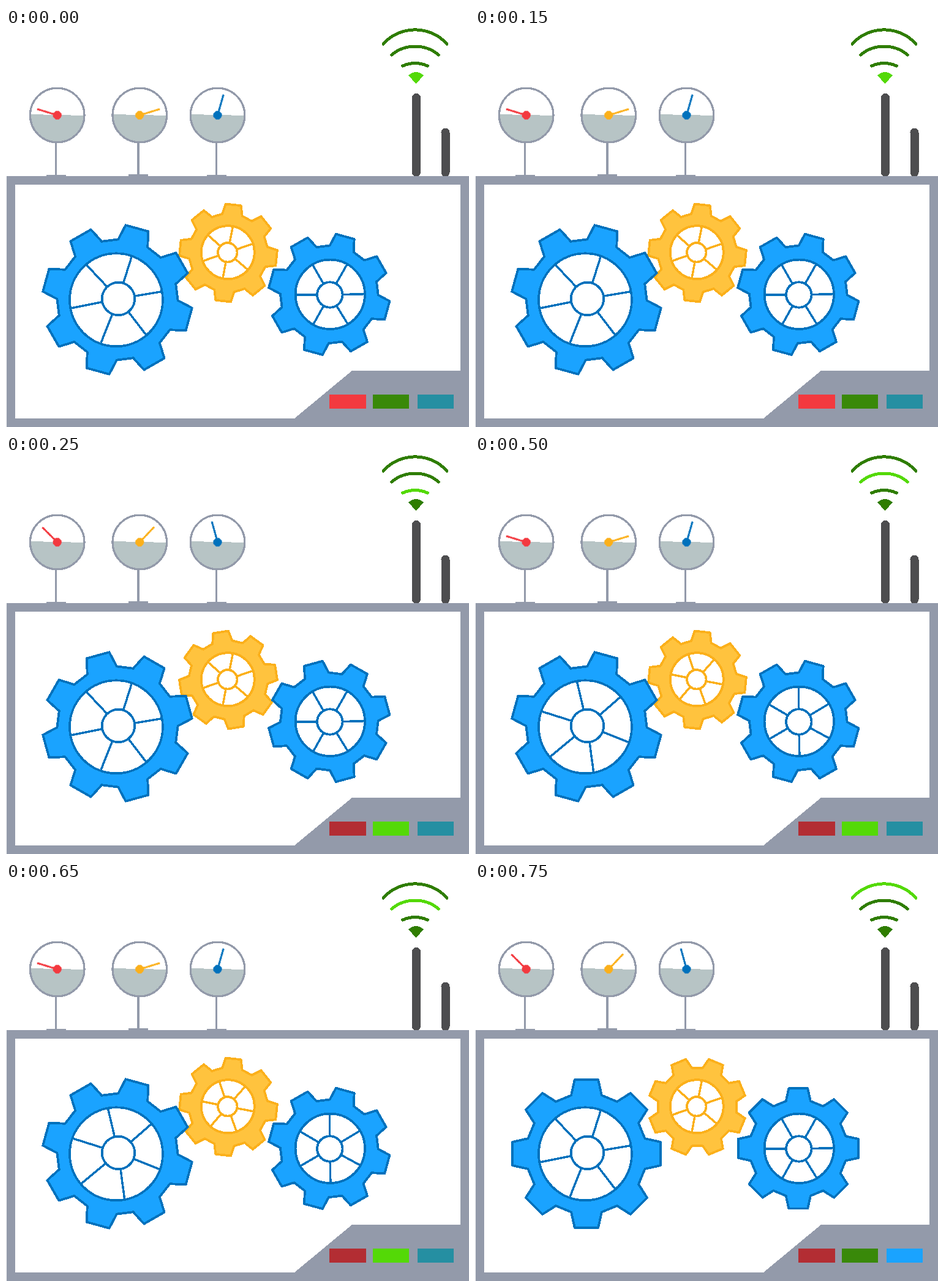
These frames come from a looping animation (756 px wide and 652 px high, 1 s). An HTML page:

```html
<!DOCTYPE html>
<html lang="en">
<head>
<meta charset="utf-8">
<title>Gear machine</title>
<style>
  html, body { margin: 0; width: 100%; height: 100%; overflow: hidden; background: #fff; }
  svg { display: block; width: 756px; height: 652px; }

  .pose { animation: show 1s step-end infinite; }
  .lamp { color: var(--off); animation: lit 1s step-end infinite; }
  .lamp.long { animation-name: lit-long; }
  .needle { animation: swing .5s step-end infinite; }
  .t1 { animation-delay: -.75s; }
  .t2 { animation-delay: -.5s; }
  .t3 { animation-delay: -.25s; }

  .red { --on: #f3393f; --off: #b32d33; }
  .green { --on: #54d907; --off: #398909; }
  .blue { --on: #1aa3ff; --off: #258fa2; }
  .signal { --on: #54d907; --off: #2f7d00; }

  @keyframes show { 0% { visibility: visible; } 25%, 100% { visibility: hidden; } }
  @keyframes lit { 0% { color: var(--on); } 25%, 100% { color: var(--off); } }
  @keyframes lit-long { 0% { color: var(--on); } 50%, 100% { color: var(--off); } }
  @keyframes swing { 0% { transform: rotate(0deg); } 50%, 100% { transform: rotate(var(--swing)); } }
</style>
</head>
<body>
<svg viewBox="0 0 756 652" shape-rendering="crispEdges">
  <!-- antennas -->
  <g stroke="#4d4d4f" stroke-width="14" stroke-linecap="round">
    <path d="M670 114V236M717.500 170.500V236"/>
  </g>

  <!-- signal -->
  <g fill="none" stroke="currentColor" stroke-width="5" stroke-linecap="round">
    <path class="lamp signal" fill="currentColor" stroke="none" d="M657 77.500Q669 66.500 682 77.500L669.500 91z"/>
    <path class="lamp signal t1" d="M647.500 62A51 51 0 0 1 688.500 62"/>
    <path class="lamp signal t2" d="M629.500 44A60 60 0 0 1 706.500 44"/>
    <path class="lamp signal t3" d="M616 26A70 70 0 0 1 720 26"/>
  </g>

  <g id="gauges"></g>

  <!-- cabinet -->
  <path fill="#939aaa" d="M1 242H756V652H1z"/>
  <path fill="#fff" d="M15 256H742V560H565L471 638H15z"/>
  <g fill="currentColor">
    <path class="lamp red" d="M528 599h60v23h-60z"/>
    <path class="lamp green long t1" d="M599 599h59v23h-59z"/>
    <path class="lamp blue t3" d="M672 599h59v23h-59z"/>
  </g>

  <g id="gears"></g>
</svg>

<script>
const BLUE = '#0071bc', YELLOW = '#fbb01b', RED = '#f3393f';

const polar = ([x, y], r, deg) => {
  const a = deg * Math.PI / 180;
  return [x + r * Math.cos(a), y + r * Math.sin(a)].map(v => +v.toFixed(1));
};

// the needle rests at an angle and swings to a second one
const gauge = (x, color, rest, swing, pole, width, foot) => `
  <path fill="#939aaa" d="M${pole - width / 2} 186h${width}V242h-${width}zM${pole - 16} ${foot}h32V243h-32z"/>
  <g transform="translate(${x} 142.500)">
    <circle r="44.500" fill="#fff"/>
    <path fill="#b7c4c5" d="M-44.500 -1.500L44.500 .5A44.500 44.500 0 0 1 -44.500 -1.500"/>
    <circle r="44.300" fill="none" stroke="#939aaa" stroke-width="3.200"/>
    <path class="needle" style="--swing:${swing}deg" d="M0 0L${polar([0, 0], 33.5, rest)}"
      stroke="${color}" stroke-width="3" stroke-linecap="round"/>
    <circle r="7" fill="${color}"/>
  </g>`;

document.getElementById('gauges').innerHTML =
  gauge(83.7, RED, 197, 28, 81.5, 3, 240) +
  gauge(218.3, YELLOW, -17, -29.5, 216, 4, 239) +
  gauge(345.5, BLUE, -74, -31.5, 343.5, 3, 240);

const teeth = (center, r, turn) => {
  const points = [];
  for (let mid = turn; mid < turn + 360; mid += 45) {
    points.push(
      polar(center, r * .805, mid - 14.6), polar(center, r, mid - 9),
      polar(center, r, mid + 9), polar(center, r * .805, mid + 14.6));
  }
  return points.join(' ');
};

// spokes run from the rim towards the hub, which sits slightly off centre
const spokes = (rim, rimR, hub, turn) => {
  let d = '';
  for (let i = 0; i < 6; i++) d += `M${hub}L${polar(rim, rimR, turn + i * 60)}`;
  return d;
};

// the rim shows a half-step turn of its spokes in the third pose only
const gear = ({ turns, body, r, rim, rimR, hub, hubR, spoke, fill, stroke }) => turns.map((turn, i) => `
  <g class="pose t${i}" fill="#fff" stroke="${stroke}" stroke-width="3.800" stroke-linejoin="round">
    <polygon points="${teeth(body, r, turn)}" fill="${fill}"/>
    <circle cx="${rim[0]}" cy="${rim[1]}" r="${rimR}"/>
    <path stroke-width="3.500" d="${spokes(rim, rimR, hub, spoke + (i === 2 ? 30 : 0))}"/>
    <circle cx="${hub[0]}" cy="${hub[1]}" r="${hubR}"/>
  </g>`).join('');

const big = { turns: [15.3, -15.3, 15.3, 0], fill: '#1aa3ff', stroke: BLUE };

document.getElementById('gears').innerHTML = [
  { turns: [6, -9, 6, 22.5], fill: '#ffc33e', stroke: YELLOW, spoke: -19,
    body: [363, 367.5], r: 80, rim: [362.3, 366.7], rimR: 43.5, hub: [361.8, 366.8], hubR: 15.7 },
  { ...big, spoke: -10.4,
    body: [182, 444], r: 122.5, rim: [180, 444.3], rimR: 76, hub: [183.5, 442.5], hubR: 26.7 },
  { ...big, spoke: -.6,
    body: [527.8, 435.4], r: 99.3, rim: [529.3, 435.3], rimR: 56.7, hub: [528.8, 436], hubR: 20.7 }
].map(gear).join('');
</script>
</body>
</html>
```
